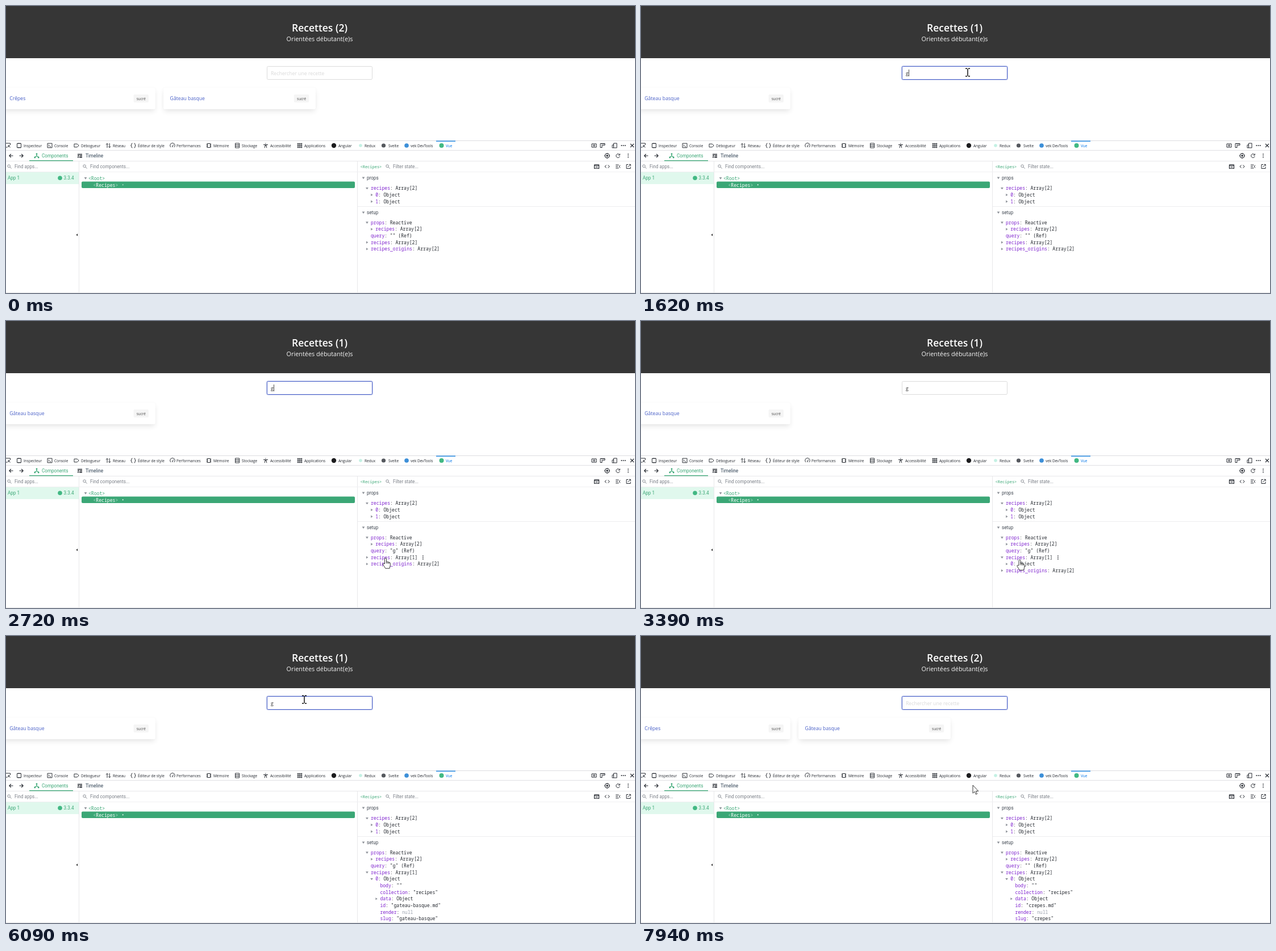
An HTML page for the animation above (8000 ms loop, 1107 px wide and 506 px high).

```html
<!DOCTYPE html>
<html lang="fr">
<head>
<meta charset="utf-8">
<title>Recettes</title>
<style>
html, body { margin: 0; width: 100%; height: 100%; overflow: hidden; background: #fff; }
body { position: relative; }
div, svg { position: absolute; box-sizing: border-box; }
svg { left: 0; top: 0; }
#head { left: 0; top: 0; width: 1107px; height: 92px; background: #363636; }
.card { left: -5px; top: 144px; width: 268px; height: 37.5px; border-radius: 2.5px; background: #fff;
  box-shadow: 0 4.6px 9.3px -1.2px rgba(10,10,10,.1), 0 0 0 .6px rgba(10,10,10,.02); }
#second { left: 277px; }
#field { left: 459px; top: 106px; width: 186px; height: 23.5px; border: 1px solid #dbdbdb; border-radius: 2.5px; background: #fff; }
#field.hover { border-color: #a8a8a8; }
#field.focus { border-color: #485fc7; box-shadow: 0 0 0 1.1px rgba(72,95,199,.25); }
.u { font-family: "Open Sans", "Noto Sans", sans-serif; }
.r { font-family: Roboto, sans-serif; }
.m { font-family: "Noto Sans Mono", "DejaVu Sans Mono", monospace; }
</style>
</head>
<body>
<div id="head"></div>
<div class="card"></div>
<div class="card" id="second"></div>
<div id="field"></div>
<svg width="1107" height="506" viewBox="0 0 1107 506"><g id="fixed"></g><g id="live"></g></svg>
<script>
const $ = id => document.getElementById(id);
const INK = '#23272e', GREEN = '#3ba776', LINK = '#485fc7', GREY = '#7c8088', LINE = '#e8e8ea';
const MONO = 8.1, CHAR = MONO * .6, ROW = 11.65;

const text = (font, x, y, size, fill, s, extra = '') =>
  `<text class="${font}" x="${x}" y="${y}" font-size="${size}" fill="${fill}" ${extra}>${s.replace(/</g, '&lt;')}</text>`;
const rect = (x, y, w, h, fill, rx = 0) =>
  `<rect x="${x}" y="${y}" width="${w}" height="${h}" rx="${rx}" fill="${fill}"/>`;
const dot = (x, y, r, fill) => `<circle cx="${x}" cy="${y}" r="${r}" fill="${fill}"/>`;
const icon = (x, y, d, color = INK, width = 1) =>
  `<path transform="translate(${x} ${y})" d="${d}" fill="none" stroke="${color}" stroke-width="${width}"/>`;
const solid = (x, y, d, color) => `<path transform="translate(${x} ${y})" d="${d}" fill="${color}"/>`;
const arrow = (x, y, open) => solid(x, y, open ? 'M-2.4-1.6H2.4L0 2Z' : 'M-1.4-2.3L2-.1L-1.4 2.1Z', '#8f939a');
const dots = (x, y, color = INK) => [-2.8, 0, 2.8].map(d => dot(x, y + d, .85, color)).join('');

const BOX = 'M-3.5-3.5h7v7h-7z', RING = 'M-4 0a4 4 0 1 0 8 0a4 4 0 1 0-8 0';
const LENS = 'M-3.2-.8a2.3 2.3 0 1 0 4.6 0a2.3 2.3 0 1 0-4.6 0M.8.8L3.6 3.6';
const EYE = 'M-4-3h8v6.5h-8zM-4-2.2h8M-2 .8h4';

// label x, label, icon x, icon path
const tools = [
  [31, 'Inspecteur', 23, BOX + 'M-1.5-5v2M1.5-5v2M-1.5 3.5v1.5M1.5 3.5v1.5'],
  [85, 'Console', 77, 'M-4-3.8h8v7.6h-8zM-2.3-1.5l1.6 1.5l-1.6 1.5M0 2h2'],
  [132, 'Débogueur', 124, 'M-4-2.8h5.2l3 2.8l-3 2.8h-5.2z'],
  [188, 'Réseau', 180, 'M-2 4V-3.6M-4-1.6l2-2l2 2M2.2-4V3.6M.2 1.6l2 2l2-2'],
  [232, 'Éditeur de style', 224, 'M-1.5-4q-1.8 0-1.6 2q.1 2-1.3 2q1.4 0 1.3 2q-.2 2 1.6 2M1.5-4q1.8 0 1.6 2q-.1 2 1.3 2q-1.4 0-1.3 2q.2 2-1.6 2'],
  [300, 'Performances', 293, 'M-2.8 3a4.2 4.2 0 1 1 5.6 0M0 1.5L1.6-1.6M-1 2h2'],
  [365, 'Mémoire', 357, 'M-2.5-3.5h5v7h-5zM-4.3-2.3h1.8M-4.3 0h1.8M-4.3 2.3h1.8M2.5-2.3h1.8M2.5 0h1.8M2.5 2.3h1.8'],
  [415, 'Stockage', 407, 'M-3.5-4h7v8h-7zM-3.5-1.3h7M-3.5 1.3h7'],
  [465, 'Accessibilité', 457, 'M-4-1.5h8M0-1.5V1M-1.8 4.2L-.8-1M1.8 4.2L.8-1M-.7-3.7h1.4'],
  [525, 'Applications', 517, 'M-3.8-3.8h1.6v1.6h-1.6zM-.8-3.8h1.6v1.6h-1.6zM2.2-3.8h1.6v1.6h-1.6zM-3.8-.8h1.6v1.6h-1.6zM-.8-.8h1.6v1.6h-1.6zM2.2-.8h1.6v1.6h-1.6zM-3.8 2.2h1.6v1.6h-1.6zM-.8 2.2h1.6v1.6h-1.6zM2.2 2.2h1.6v1.6h-1.6z'],
];
// plain marks: label x, label, mark x, colour, radius
const addons = [
  [585, 'Angular', 577, '#1c1c1e', 4.2],
  [631, 'Redux', 624, '#c4f1e4', 2.8],
  [673, 'Svelte', 664.5, '#55585e', 3.6],
  [712, 'vek DevTools', 705, '#3c8fd8', 3.8],
  [774, 'Vue', 766.5, '#41b883', 4],
];

function field([level, key, value, open], y) {
  const x = 642 + 8.2 * level;
  const at = x + (key.length + 1) * CHAR + 4.6;
  return (open === undefined ? '' : arrow(x - 6.6, y, open)) +
    text('m', x, y + 2.9, MONO, '#7e22ce', key) +
    text('m', x + key.length * CHAR, y + 2.9, MONO, '#555', ':') +
    text('m', at, y + 2.9, MONO, value === 'null' ? '#9ca3af' : INK, value);
}

function drawFixed() {
  let s = text('u', 552, 62, 10.9, '#f5f5f5', 'Orientées débutant(e)s', 'text-anchor="middle"');
  // browser toolbar
  s += rect(0, 237, 1107, 1, '#dcdce0') + rect(0, 254, 1107, 1, '#e0e0e3') + rect(757, 237.6, 34, 1.4, '#1b86e3');
  s += icon(4, 246, 'M3.5-1V-4h-8v7h3M0 0l3.5 3.5M0 3V0h3');
  for (const [x, label, ix, d] of tools) s += icon(ix, 246, d, INK, .95) + text('u', x, 248.7, 6.5, INK, label);
  for (const [x, label, ix, color, r] of addons)
    s += dot(ix, 246, r, color) + text('u', x, 248.7, 6.5, label === 'Vue' ? '#0074e8' : INK, label);
  s += icon(1035, 246, 'M-4-3h8v6h-8zM-1.3 0a1.3 1.3 0 1 0 2.6 0a1.3 1.3 0 1 0-2.6 0') +
    icon(1050, 246, 'M-4-3.5h8v2.8h-5v4.2h-3zM-1-3.5v1.5M2-3.5v1.5') +
    icon(1071, 246, 'M-1.5-4h5.5v8h-5.5zM-1.5-1h-2.5v5h2.5') +
    [-3.2, 0, 3.2].map(d => dot(1086.5 + d, 246, 1, INK)).join('') +
    icon(1102, 246, 'M-3-3L3 3M3-3L-3 3', INK, 1.1);
  // panel tabs
  s += rect(0, 273, 1107, 1, LINE) + rect(41, 272, 77, 1.3, GREEN);
  s += icon(9, 264, 'M3.5 0H-3M-.2-3L-3.2 0L-.2 3', INK, 1.1) + icon(27, 264, 'M-3.5 0H3M.2-3L3.2 0L.2 3', INK, 1.1);
  s += icon(54, 264, 'M0-3V0L-3.3 3M0 0L3.3 3', GREEN, 1.1) + dot(54, 260.8, 1.4, GREEN) + dot(50.8, 267, 1.4, GREEN) + dot(57.2, 267, 1.4, GREEN);
  s += text('r', 63, 267, 8.15, GREEN, 'Components');
  s += icon(130, 264, 'M-4-2.5h8M-4 0h3M0 0h4M-4 2.7h2M-1 2.7h5', INK, 1.7) + text('r', 140, 267, 8.15, '#2c3e50', 'Timeline');
  s += icon(1058, 264, RING + 'M0-5v2M0 3v2M-5 0h2M3 0h2') + dot(1058, 264, 1.8, INK) +
    icon(1077, 264, 'M2.6-2A3.3 3.3 0 1 0 3.2 1M3.3-3.6V-1H.7') + dots(1095, 264);
  // columns and search bars
  s += rect(128, 274, 1, 232, LINE) + rect(618, 274, 1, 232, LINE) + rect(0, 292, 1107, 1, '#f0f0f2') + rect(0, 505, 1107, 1, LINE);
  for (const [x, label] of [[6, 'Find apps...'], [139, 'Find components...'], [672, 'Filter state...']])
    s += icon(x, 283, LENS, GREY, .9) + text('r', x + 9, 286, 8.15, GREY, label);
  s += text('m', 623.5, 285.7, 7, GREEN, '<Recipes>');
  s += icon(1039.5, 283, EYE, INK, 1.2) + icon(1058, 283, 'M-1.5-2.7L-4 0L-1.5 2.7M1.5-2.7L4 0L1.5 2.7') +
    icon(1077, 283, 'M-4-2.8h5.5M-4 0h4M-4 2.8h5.5M4-2.3L2 0L4 2.3') +
    icon(1095.5, 283, 'M-.5-3.5h-3v7h7v-3M1-3.7h2.7V-1M3.5-3.5L-1 1');
  // app list
  s += rect(0, 293, 128, 21, '#e0f8ed') + text('r', 3, 306.3, 8.15, GREEN, 'App 1') + dot(95, 303.3, 3.8, '#41b883') +
    text('r', 101.5, 306.3, 8.15, GREEN, '3.3.4');
  s += rect(122, 396, 6, 15, '#fff', 2) + solid(125, 403.5, 'M1.2-2.2V2.2L-1.6 0Z', '#333');
  // component tree
  s += arrow(140, 303.7, true) + text('m', 145, 306.7, MONO, GREEN, '<Root>');
  s += rect(133, 309.5, 481, 11.5, GREEN, 2) + text('m', 153.5, 318.5, MONO, '#a9dcc5', '<') +
    text('m', 153.5 + CHAR, 318.5, MONO, '#fff', 'Recipes') + text('m', 153.5 + 8 * CHAR, 318.5, MONO, '#a9dcc5', '>');
  // state sections
  s += rect(619, 353, 488, 1, '#ededf0');
  s += arrow(629, 303.2, true) + text('r', 635, 306, 8.15, '#3f4650', 'props');
  s += arrow(629, 364.2, true) + text('r', 635, 367, 8.15, '#3f4650', 'setup');
  [[0, 'recipes', 'Array[2]', true], [1, '0', 'Object', false], [1, '1', 'Object', false]]
    .forEach((f, i) => s += field(f, 321.5 + i * ROW));
  return s;
}

// time, x, y of the pointer
const path = [
  [70, 1100, 496], [300, 850, 330], [550, 615, 140], [680, 575, 115.5], [820, 575, 117], [1680, 575, 117],
  [1850, 655, 290], [2040, 717, 404], [2320, 678, 417], [2720, 668, 418], [2950, 668, 418], [3390, 666.5, 421],
  [3530, 665, 424], [3800, 656, 429], [4290, 655, 430], [4480, 632, 335], [4710, 585, 171], [4950, 550, 134],
  [5130, 536, 120], [5260, 525, 112], [6800, 525, 112], [7050, 580, 195], [7230, 600, 272], [7450, 577, 264],
  [7660, 577, 264], [7800, 576, 260], [7940, 584, 263], [8000, 584, 263],
];
function pointer(t) {
  const i = path.findIndex(p => p[0] > t);
  const [t0, x0, y0] = path[i - 1], [t1, x1, y1] = path[i];
  const k = (t - t0) / (t1 - t0);
  return [x0 + (x1 - x0) * k, y0 + (y1 - y0) * k];
}

const within = (t, spans) => spans.some(([a, b]) => t >= a && t < b);
const BEAM = 'M-4-6.8H-.9M.9-6.8H4M0-6.3V6.3M-4 6.8H-.9M.9 6.8H4';
const ARROW = 'M0 0V14.2L3.2 11.3L5.4 16.2L7.6 15.2L5.4 10.5H9.8Z';
const HAND = 'M-1.5 10V1.4a1.5 1.5 0 0 1 3 0V6.5q1.4-.8 2.3.4q1.4-.5 2.2.6q2-.3 2.3 1.5V13L7 18.2H-.2L-4.4 11.6q-.8-2 1-1.9Z';
const FINGERS = 'M1.5 6.5V9.5M3.8 7V9.8M6 7.6V10';

function drawLive(t) {
  const typed = within(t, [[1560, 6290]]);
  const synced = within(t, [[1700, 6430]]);
  const focus = within(t, [[1090, 2920], [5540, 8000]]);
  const shown = t >= 70;
  const [x, y] = shown ? pointer(t) : [-99, -99];
  const overInput = x > 459 && x < 645 && y > 104 && y < 130;

  $('second').style.display = typed ? 'none' : '';
  $('field').className = focus ? 'focus' : overInput ? 'hover' : '';

  let s = text('u', 552, 45.2, 17.5, '#fff', `Recettes (${typed ? 1 : 2})`, 'text-anchor="middle" font-weight="600"');
  s += typed ? text('u', 466, 122, 8.7, '#363636', 'g') : text('u', 466, 122, 8.7, '#d9d9d9', 'Rechercher une recette');
  (typed ? ['Gâteau basque'] : ['Crêpes', 'Gâteau basque']).forEach((name, i) => {
    const left = 282.3 * i;
    s += text('u', 6.3 + left, 166, 8.7, LINK, name) + rect(224.5 + left, 156, 26.5, 14, '#f5f5f5', 2.3) +
      text('u', 229.8 + left, 165.6, 6.4, '#4a4a4a', 'sucré');
  });
  if (within(t, [[1160, 1560], [1560, 2010], [2510, 2920], [5610, 6090], [6290, 6640], [7150, 7660]]))
    s += rect(typed ? 471 : 466, 112, .8, 12, '#222');
  s += `<g opacity="${t < 950 ? .6 : .95}">${dot(205.7, 315.3, 1, '#fff')}</g>`;

  const open = t >= 3120, deep = t >= 3900;
  const slug = synced ? 'gateau-basque' : 'crepes';
  const rows = [
    [0, 'props', 'Reactive', true],
    [1, 'recipes', 'Array[2]', false],
    [0, 'query', `"${synced ? 'g' : ''}" (Ref)`],
    [0, 'recipes', `Array[${synced ? 1 : 2}]`, open],
  ];
  if (open) rows.push([1, '0', 'Object', deep]);
  if (deep) rows.push(
    [2, 'body', '""'], [2, 'collection', '"recipes"'], [2, 'data', 'Object', false],
    [2, 'id', `"${slug}.md"`], [2, 'render', 'null'], [2, 'slug', `"${slug}"`]);
  rows.push([0, 'recipes_origins', 'Array[2]', false]);
  const over = x > 619 ? Math.floor((y - 376.1) / ROW) : -1;
  rows.forEach((row, i) => {
    const cy = 381.9 + i * ROW;
    if (cy < 506) s += field(row, cy);
    else s += `<g clip-path="inset(0 0 0 0)">${field(row, cy)}</g>`;
    if (i !== over) return;
    const end = 642 + 8.2 * row[0] + (row[1].length + 1 + row[2].length) * CHAR + 4.6;
    const edit = row[1] === 'query';
    if (edit) s += solid(end + 9, cy - .3, 'M-3.6 3.6V1.8L1.4-3.2L3.2-1.4L-1.8 3.6ZM2-3.7L2.8-4.2L4.2-2.8L3.7-2Z', INK);
    s += dots(end + (edit ? 24 : 9.5), cy);
  });
  s += rect(0, 505, 1107, 1, LINE);

  if (shown) {
    const at = `<g transform="translate(${x.toFixed(1)} ${y.toFixed(1)})" fill="#fff" stroke="#222" stroke-width=".9" stroke-linejoin="round">`;
    if (overInput) s += icon(x, y, BEAM, '#111', 1.5);
    else if (over >= 0 && over < rows.length) s += at + `<path d="${HAND}"/><path d="${FINGERS}"/></g>`;
    else s += at + `<path d="${ARROW}"/></g>`;
  }
  return s;
}

$('fixed').innerHTML = drawFixed();
let start;
function frame(now) {
  start ??= now;
  $('live').innerHTML = drawLive((now - start) % 8000);
  requestAnimationFrame(frame);
}
requestAnimationFrame(frame);
</script>
</body>
</html>
```
